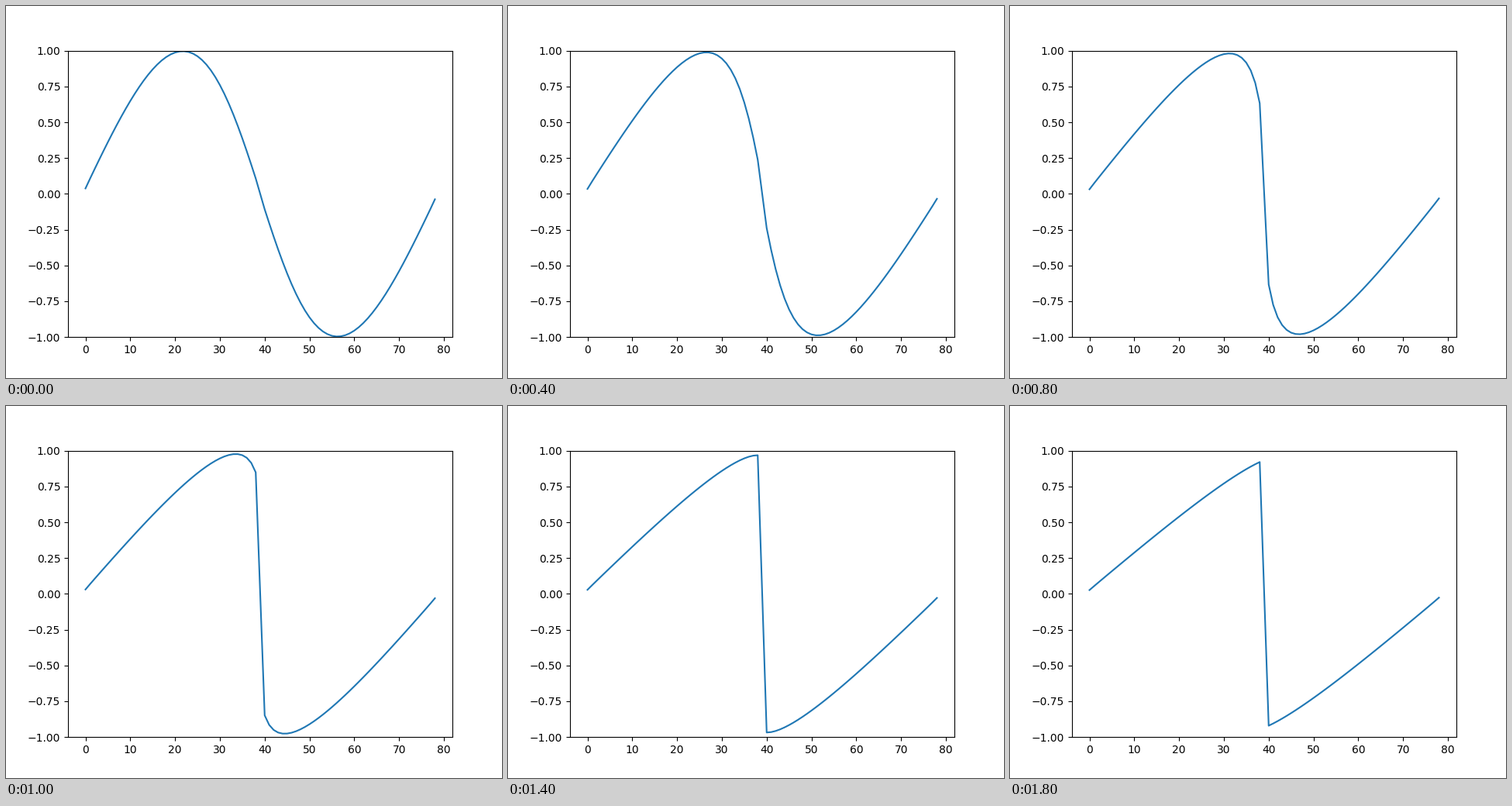
Write a matplotlib script that moves like this. It is 640 px wide and 480 px high and loops after 2000 ms.

```python
import numpy as np
import matplotlib.pyplot as plt
from matplotlib.animation import FuncAnimation

CELLS = 79
FRAMES = 10
STEPS_PER_FRAME = 5
CFL = 0.5


def godunov_flux(left, right):
    """Exact Riemann flux for Burgers' equation."""
    return 0.5 * np.maximum(np.maximum(left, 0) ** 2, np.minimum(right, 0) ** 2)


def step(u):
    """One conservative step on a periodic grid."""
    flux = godunov_flux(u, np.roll(u, -1))
    return u - CFL * (flux - np.roll(flux, 1))


def solve():
    u = np.sin(2 * np.pi * (np.arange(CELLS) + 0.5) / CELLS)
    states = []
    for _ in range(FRAMES):
        for _ in range(STEPS_PER_FRAME):
            u = step(u)
        states.append(u)
    return states


states = solve()
fig, ax = plt.subplots(figsize=(6.4, 4.8), dpi=100)
line, = ax.plot(states[0])
ax.set_ylim(-1, 1)


def update(frame):
    line.set_ydata(states[frame])
    return line,


anim = FuncAnimation(fig, update, frames=FRAMES, interval=200, repeat=True)
plt.show()
```
